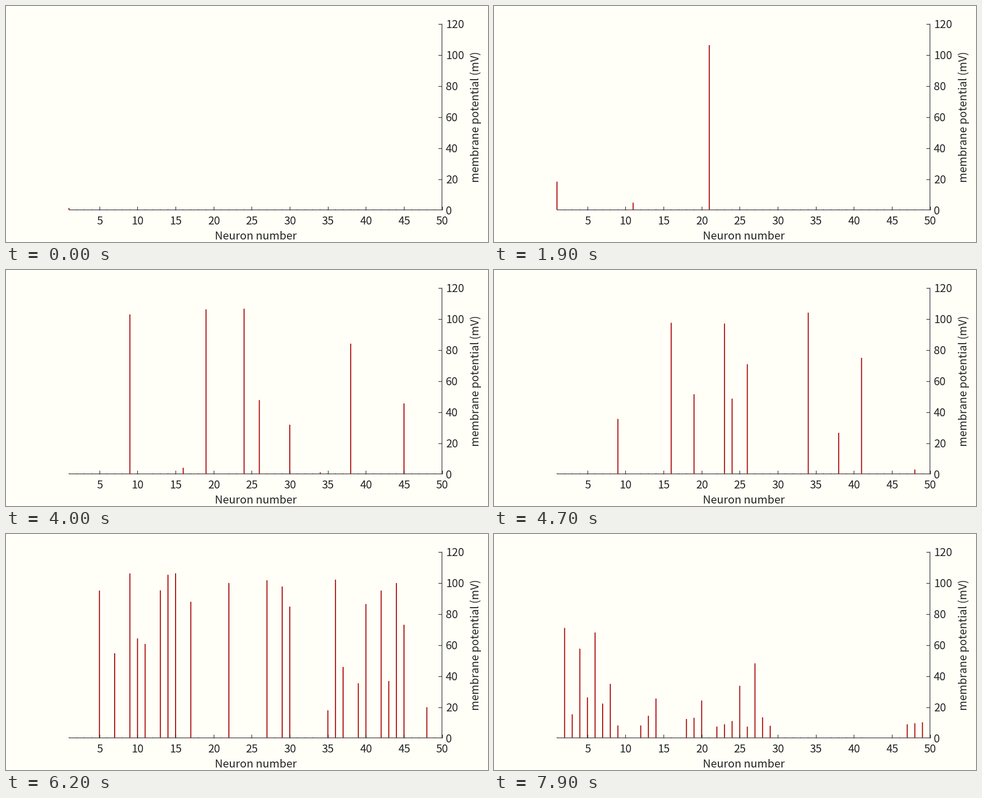
Animation, 958 px wide and 471 px high, one loop 8 s. Source, as a matplotlib script:

```python
import numpy as np
import matplotlib.pyplot as plt
from matplotlib.animation import FuncAnimation
from matplotlib.collections import LineCollection

W, H, DPI = 958, 471, 100
FRAMES, STEP = 80, 100
PAPER, INK, RED = "#fffff8", "#222222", "#ab0808"
PX = 72 / DPI  # points per pixel
BASE, SCALE = 406.9, 371.6 / 120
PEAK, FALL, REFRACTORY = 107.7, 9.6, 18

# The first few neurons to fire, with the time of their peak.
FIRST = {1: 5.9, 21: 19, 11: 23.8, 30: 28.3, 45: 29.8, 38: 34.75,
         16: 45, 34: 46, 23: 47.9, 41: 48.5}

# Later volleys: mean time, spread, first and last neuron, chance to fire.
VOLLEYS = [
    (39.5, 1.2, 2, 28, 0.3),
    (53, 2, 6, 49, 0.25),
    (59.5, 1.5, 1, 50, 0.5),
    (64.5, 1, 28, 46, 0.3),
    (70.4, 0.4, 7, 30, 0.3),
    (81.6, 0.8, 2, 29, 0.65),
    (82, 0.3, 47, 49, 1),
]


def make_spikes(rng):
    """Peak time and fall stretch of every spike, per neuron."""
    spikes = {n: [] for n in range(1, 51)}
    for n, peak in FIRST.items():
        spikes[n].append((peak, 1.55 if peak < 40 else 1.05))
    for mean, spread, lo, hi, chance in VOLLEYS:
        for n in range(lo, hi + 1):
            peak = rng.normal(mean, spread)
            stretch = 1 + rng.exponential(0.2)
            rested = all(abs(peak - p) > REFRACTORY for p, _ in spikes[n])
            if rng.random() < chance and rested:
                spikes[n].append((peak, stretch))
    return spikes


def spike(t, peak, stretch):
    """Slow ramp, fast upstroke, long fall and undershoot."""
    dt = t - peak
    if dt <= 0:
        ramp = 6 * np.exp(-((dt + 4) / 1.5) ** 2)
        return ramp + PEAK / (1 + np.exp(-2.3 * (dt + 1.85)))
    dt /= stretch
    return PEAK * (1 - (dt / FALL) ** 1.45) if dt < 22 else 0


def voltage(parts):
    return max(parts, key=lambda v: (v > 0.3, abs(v)), default=0)


def neuron_x(n):
    return 125.2 + 15.133 * (n - 1)


plt.rcParams["font.family"] = "Noto Sans CJK JP"
fig = plt.figure(figsize=(W / DPI, H / DPI), dpi=DPI, facecolor=PAPER)
ax = fig.add_axes([0, 0, 1, 1])
ax.set_xlim(0, W)
ax.set_ylim(H, 0)
ax.axis("off")


def stroke(x, y, **kw):
    ax.plot(x, y, color=INK, lw=1.2 * PX, solid_capstyle="butt", zorder=3, **kw)


def label(x, y, s, size=22, **kw):
    kw = {"ha": "center", "va": "baseline", **kw}
    ax.text(x, y, s, fontsize=size * PX, color=INK, **kw)


stroke([125, 867], [BASE, BASE], snap=False)
stroke([866.5, 866.5], [35, 407])
for n in range(5, 51, 5):
    x = neuron_x(n)
    stroke([x, x], [399.5, BASE])
    label(x + 0.3, 436, str(n))
for v in range(0, 121, 20):
    y = round(BASE - v * SCALE) + 0.5
    if v:
        stroke([859, 866.5], [y, y])
    label(874, y + 8.5, str(v), ha="left")
label(496, 466, "Neuron number")
label(940, 221, "membrane potential (mV)", 21.7, rotation=90, rotation_mode="anchor")

bars = LineCollection([], colors=RED, linewidths=2 * PX, capstyle="butt", zorder=2)
bars.set_snap(False)
ax.add_collection(bars, autolim=False)
spikes = make_spikes(np.random.default_rng(4))


def draw(t):
    segs = []
    for n, events in spikes.items():
        v = voltage([spike(t, *e) for e in events])
        if v >= 0:
            x = neuron_x(n)
            segs.append([(x, BASE), (x, BASE - max(v, 0.3) * SCALE)])
    bars.set_segments(segs)
    return [bars]


anim = FuncAnimation(fig, draw, frames=FRAMES, interval=STEP, repeat=True, repeat_delay=0)
plt.show()
```
